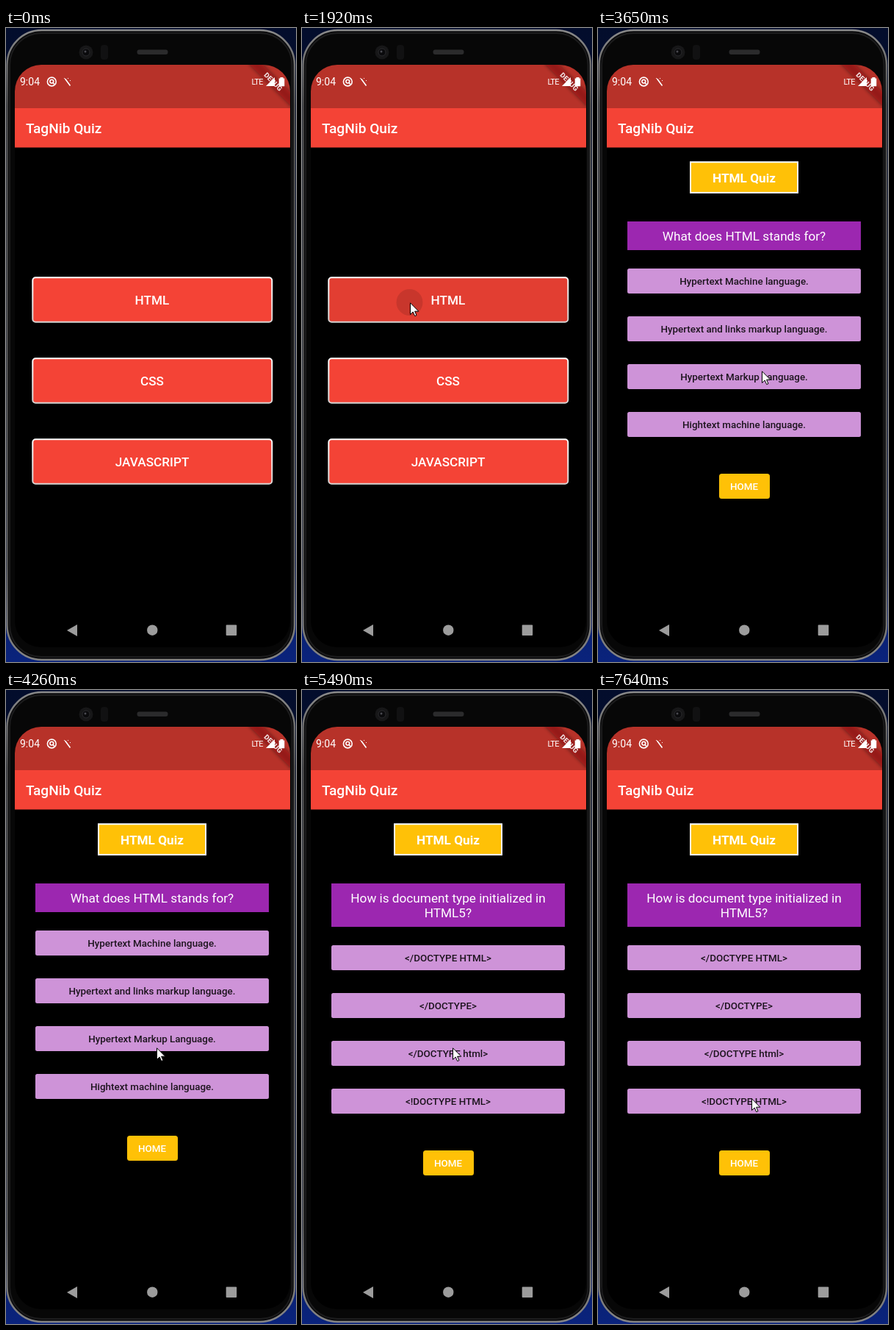
Write an HTML page that moves like this. It is 395 by 862 pixels and loops after 8000 ms.

```html
<!DOCTYPE html>
<html lang="en">
<head>
<meta charset="utf-8">
<title>Quiz app</title>
<style>
html, body { margin: 0; width: 100%; height: 100%; overflow: hidden; background: #000; }
svg { display: block; width: 395px; height: 862px; }
text { font-family: Roboto, sans-serif; fill: #fff; }
.mid text { text-anchor: middle; }
.big { font-size: 17.2px; font-weight: 500; }
.question { font-size: 17.2px; }
.answers text { font-size: 13.4px; font-weight: 500; fill: #1d141e; }
.action { font-size: 13.4px; font-weight: 500; }

/* every percentage is milliseconds / 80 */
.menu, .quiz1, .quiz2, .press1, .press2, .held, .spot, .pointer, .arrow {
  animation: 8s step-end infinite;
}
.menu { animation-name: menu; }
.quiz1 { animation-name: quiz1; }
.quiz2 { animation-name: quiz2; }
.press1 { animation-name: press1; }
.press2 { animation-name: press2; }
.held { animation-name: held; }
.spot { animation-name: spot; }
.arrow { animation-name: arrow; }
.pointer { animation-name: move; }
.wave1, .wave2 { transform-box: fill-box; transform-origin: center; animation: 8s step-end infinite; }
.wave1 { animation-name: wave1; }
.wave2 { animation-name: wave2; }

@keyframes menu { 0% { visibility: visible } 25.625%, 100% { visibility: hidden } }
@keyframes quiz1 { 0% { visibility: hidden } 25.625% { visibility: visible } 66.875%, 100% { visibility: hidden } }
@keyframes quiz2 { 0% { visibility: hidden } 66.875%, 100% { visibility: visible } }
@keyframes press1 { 0% { opacity: 0 } 23.125% { opacity: 1 } 25.625%, 100% { opacity: 0 } }
@keyframes wave1 { 0% { transform: scale(.6) } 24%, 100% { transform: scale(1) } }
@keyframes press2 { 0% { opacity: 0 } 63.5% { opacity: 1 } 66.875%, 100% { opacity: 0 } }
@keyframes wave2 {
  0% { transform: scale(.5) } 64.25% { transform: scale(.75) }
  65.125% { transform: scale(1) } 66%, 100% { transform: scale(1.6) }
}
@keyframes held { 0% { opacity: 0 } 66.875% { opacity: 1 } 68.625%, 100% { opacity: 0 } }
@keyframes spot {
  0% { opacity: 0 } 20.75% { opacity: 1 } 23.125% { opacity: 0 }
  62.625% { opacity: 1 } 66%, 100% { opacity: 0 }
}
@keyframes arrow { 0% { opacity: 0 } 3.125%, 100% { opacity: 1 } }
@keyframes move {
  0% { transform: translate(252px, 608px) }
  3.125% { transform: translate(252px, 608px); animation-timing-function: steps(9) }
  10.875% { transform: translate(180px, 395px) }
  15.75% { transform: translate(169px, 388px); animation-timing-function: steps(2) }
  17.375% { transform: translate(147px, 373px) }
  34.75% { transform: translate(185px, 417px) }
  35.625% { transform: translate(182px, 450px); animation-timing-function: steps(2) }
  37.25% { transform: translate(176px, 525px); animation-timing-function: steps(2) }
  38.875% { transform: translate(207px, 543px); animation-timing-function: steps(3) }
  41% { transform: translate(245px, 515px); animation-timing-function: steps(4) }
  44.75% { transform: translate(230px, 470px) }
  45.625% { transform: translate(223px, 466px) }
  46.5% { transform: translate(190px, 449px); animation-timing-function: steps(2) }
  48.25% { transform: translate(157px, 462px); animation-timing-function: steps(2) }
  50% { transform: translate(185px, 484px); animation-timing-function: steps(2) }
  51.5% { transform: translate(244px, 480px); animation-timing-function: steps(2) }
  53.25% { transform: translate(205px, 486px) }
  72% { transform: translate(203px, 474px); animation-timing-function: steps(4) }
  75.5% { transform: translate(193px, 376px); animation-timing-function: steps(3) }
  78.5% { transform: translate(218px, 420px); animation-timing-function: steps(3) }
  81.375% { transform: translate(240px, 503px) }
  82.125% { transform: translate(239px, 512px); animation-timing-function: steps(6) }
  87% { transform: translate(228px, 557px); animation-timing-function: steps(5) }
  91.375% { transform: translate(209px, 548px) }
  92.25% { transform: translate(209px, 540px); animation-timing-function: steps(4) }
  95.5%, 100% { transform: translate(209px, 555px) }
}
</style>
</head>
<body>
<svg viewBox="0 0 395 862">
  <defs>
    <linearGradient id="sky" x2="0" y2="1">
      <stop offset="0" stop-color="#030d2c"/>
      <stop offset=".6" stop-color="#05133f"/>
      <stop offset="1" stop-color="#0a237c"/>
    </linearGradient>
    <linearGradient id="rim" x2="0" y2="1">
      <stop offset="0" stop-color="#8a8a8a"/>
      <stop offset=".12" stop-color="#4c4c4c"/>
      <stop offset=".85" stop-color="#5a5a5a"/>
      <stop offset="1" stop-color="#858585"/>
    </linearGradient>
    <linearGradient id="edge" x2="0" y2="1">
      <stop offset="0" stop-color="#fff"/>
      <stop offset="1" stop-color="#d8d4d2"/>
    </linearGradient>
    <clipPath id="screen"><rect x="12" y="50" width="375" height="792" rx="36"/></clipPath>
    <clipPath id="menuClip"><rect x="37" y="340" width="325" height="59" rx="3"/></clipPath>
    <clipPath id="rowClip"><rect x="40" y="457" width="318" height="34" rx="2.5"/></clipPath>
    <filter id="soft" x="-20%" y="-100%" width="140%" height="300%"><feGaussianBlur stdDeviation="2.5"/></filter>
    <rect id="choice" x="36.3" y="339.2" width="326" height="60.6" rx="4" fill="#f44336" stroke="url(#edge)" stroke-width="2"/>
    <rect id="row" x="40" y="327" width="318" height="34" rx="2.5" fill="#ce93d8"/>
    <g id="rows">
      <use href="#row"/>
      <use href="#row" y="65"/>
      <use href="#row" y="130"/>
      <use href="#row" y="195"/>
      <rect x="165" y="606" width="69" height="34" rx="3.5" fill="#ffc107"/>
    </g>
    <g id="heading">
      <rect x="126" y="182.3" width="146" height="41.6" fill="#ffc107" stroke="#fff" stroke-width="2"/>
      <text x="199" y="209.8" font-size="17.2" font-weight="700" text-anchor="middle">HTML Quiz</text>
    </g>
  </defs>

  <!-- phone body -->
  <rect width="395" height="862" fill="url(#sky)"/>
  <rect x="1.5" y="3" width="391.5" height="856" rx="47" fill="#0a0a0b" stroke="url(#rim)" stroke-width="2.5"/>
  <rect x="5" y="7" width="384.5" height="848" rx="43" fill="#070707" stroke="#1c1c1d" stroke-width="2"/>
  <circle cx="109" cy="33" r="9.5" fill="#171718"/>
  <circle cx="109" cy="33" r="5" fill="#0a0a0c" stroke="#2a2a2d"/>
  <circle cx="108" cy="32" r="1.5" fill="#4a4a50"/>
  <rect x="129" y="23" width="10" height="20" rx="4" fill="#111112"/>
  <rect x="178.5" y="29.5" width="42" height="6.5" rx="3" fill="#2b2b2c"/>

  <!-- bars -->
  <g clip-path="url(#screen)">
    <rect x="12" y="50" width="375" height="792"/>
    <rect x="12" y="50" width="375" height="59" fill="#b73229"/>
    <rect x="12" y="109" width="375" height="53.5" fill="#f44336"/>
    <g transform="translate(364 73) rotate(45)">
      <rect x="-42" y="-6" width="84" height="12" opacity=".5" filter="url(#soft)"/>
      <rect x="-42" y="-6" width="84" height="12" fill="#b71c1c" opacity=".63"/>
    </g>
  </g>
  <text x="19" y="78.4" font-size="14">9:04</text>
  <g fill="none" stroke="#fff" stroke-width="1.6">
    <circle cx="62.3" cy="73" r="5.9"/>
    <circle cx="62.3" cy="72.6" r="2.4"/>
    <path d="M63.5 74l3 3M80.5 69l7 9.5"/>
  </g>
  <path d="M79 68h1v1h-1zM84 68h1v1h-1zM87 71h1v1h-1z" fill="#fff"/>
  <text x="334.5" y="77.3" font-size="11" letter-spacing="-.6">LTE</text>
  <path d="M354 79l12-12v12z" fill="#fff"/>
  <path d="M373.5 67h4v1.5h1.8v10.7h-7.6V68.500h1.8z" fill="#fff"/>
  <g transform="translate(364 73) rotate(45)">
    <text y="3.4" font-size="9.6" font-weight="900" text-anchor="middle" fill-opacity=".85">DEBUG</text>
  </g>
  <text x="27" y="142.800" font-size="19.1" font-weight="500">TagNib Quiz</text>
  <g fill="#9c9c9c">
    <path d="M83 819l14-8v16z"/>
    <circle cx="199.3" cy="818.7" r="7.2"/>
    <rect x="299.700" y="811.5" width="14.5" height="14.5" rx="1"/>
  </g>

  <!-- pages -->
  <g class="menu mid">
    <use href="#choice"/>
    <use href="#choice" y="110"/>
    <use href="#choice" y="220"/>
    <g class="press1" clip-path="url(#menuClip)">
      <rect x="37" y="340" width="325" height="59" fill-opacity=".07"/>
      <circle class="wave1" cx="146.5" cy="373" r="18" fill-opacity=".12"/>
    </g>
    <g class="big">
      <text x="199" y="375.700">HTML</text>
      <text x="199" y="485.700">CSS</text>
      <text x="199" y="595.700">JAVASCRIPT</text>
    </g>
  </g>

  <g class="quiz1 mid">
    <use href="#heading"/>
    <rect x="40" y="263" width="318" height="39" fill="#9c27b0"/>
    <text class="question" x="199" y="288.700">What does HTML stands for?</text>
    <use href="#rows"/>
    <g class="press2" clip-path="url(#rowClip)">
      <rect x="40" y="457" width="318" height="34" fill-opacity=".14"/>
      <circle class="wave2" cx="205" cy="486" r="27" fill-opacity=".13"/>
    </g>
    <g class="answers">
      <text x="199" y="348.700">Hypertext Machine language.</text>
      <text x="199" y="413.700">Hypertext and links markup language.</text>
      <text x="199" y="478.700">Hypertext Markup Language.</text>
      <text x="199" y="543.700">Hightext machine language.</text>
    </g>
    <text class="action" x="199" y="627.800">HOME</text>
  </g>

  <g class="quiz2 mid">
    <use href="#heading"/>
    <rect x="40" y="263" width="318" height="59" fill="#9c27b0"/>
    <g class="question">
      <text x="199" y="288.700">How is document type initialized in</text>
      <text x="199" y="308.800">HTML5?</text>
    </g>
    <use href="#rows" y="20"/>
    <rect class="held" x="40" y="477" width="318" height="34" rx="2.5" fill-opacity=".1"/>
    <g class="answers">
      <text x="199" y="368.700">&lt;/DOCTYPE HTML&gt;</text>
      <text x="199" y="433.700">&lt;/DOCTYPE&gt;</text>
      <text x="199" y="498.700">&lt;/DOCTYPE html&gt;</text>
      <text x="199" y="563.700">&lt;!DOCTYPE HTML&gt;</text>
    </g>
    <text class="action" x="199" y="647.800">HOME</text>
  </g>

  <!-- pointer -->
  <g class="pointer">
    <circle class="spot" r="15" fill="#ccc800" fill-opacity=".75"/>
    <path class="arrow" d="M.5 .8V16.500L4.200 13 6.700 18.600 9 17.600 6.600 12.200H11.800z" fill="#fff" stroke="#000"/>
  </g>
</svg>
</body>
</html>
```
